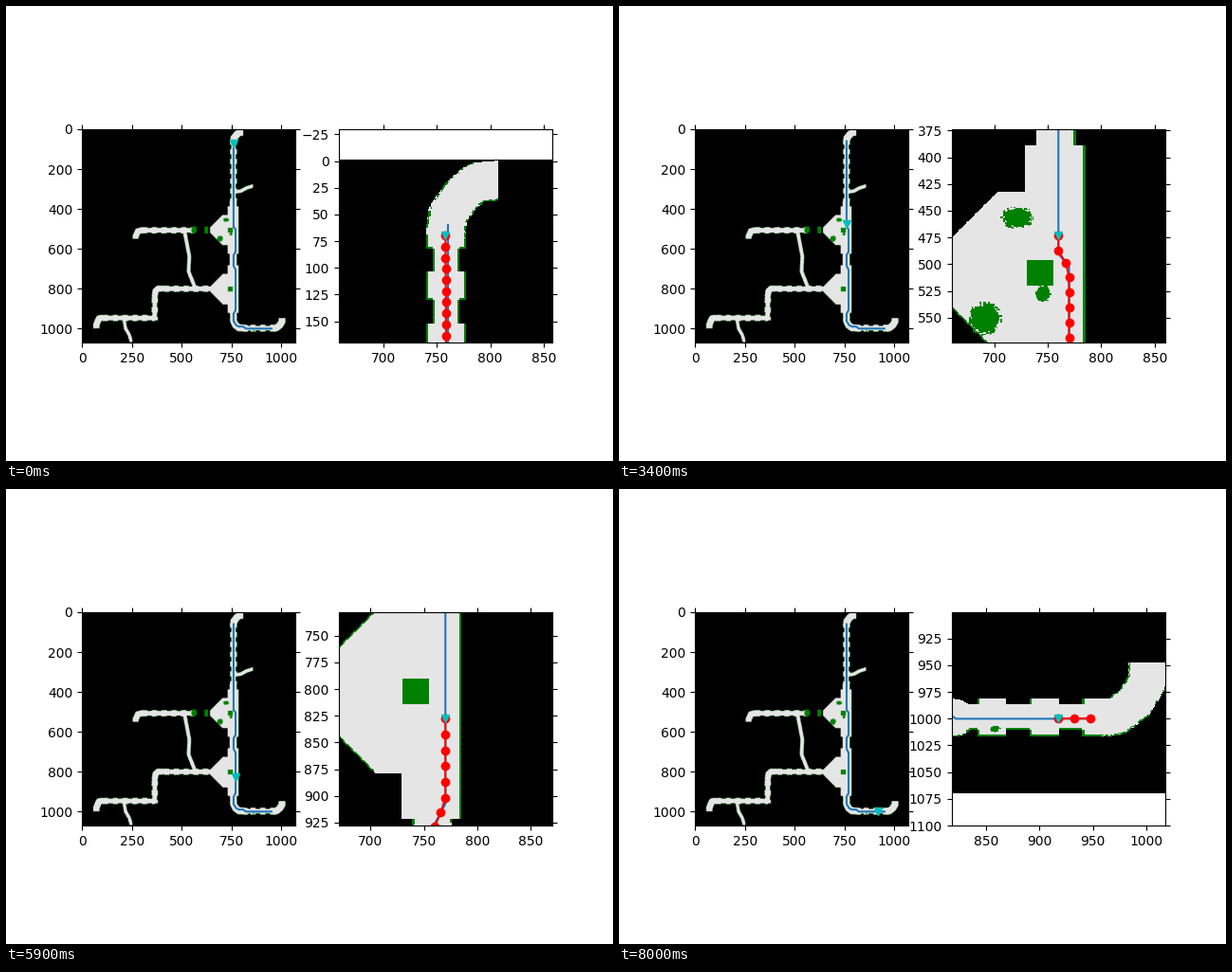
A matplotlib script for the animation above (8100 ms loop, 640 by 480 pixels).

```python
import numpy as np
import matplotlib.pyplot as plt
from matplotlib.animation import FuncAnimation
from matplotlib.ticker import MultipleLocator

FRAMES, INTERVAL = 81, 100
WIDTH, HEIGHT = 1072, 1070
FLOOR, WALL = (229, 229, 229), (0, 128, 0)
SHAFT_X, HALL_YS = 757.7, (508.5, 803)

rng = np.random.default_rng(4)
X, Y = np.meshgrid(np.arange(WIDTH), np.arange(HEIGHT))


def noise():
    """Random values in two-unit grains."""
    return rng.random((HEIGHT // 2, WIDTH // 2)).repeat(2, 0).repeat(2, 1)


def box(x0, y0, x1, y1):
    return (X >= x0) & (X < x1) & (Y >= y0) & (Y < y1)


def notched(along, across, start, end, centre, phase, wide=18.5, narrow=12.3):
    """Straight corridor whose walls step in and out."""
    half = np.where((along - phase) % 48.9 < 27, wide, narrow)
    return (along >= start) & (along < end) & (np.abs(across - centre) < half)


def tunnel(half, *points):
    """Everything within a given distance of a polyline."""
    mask = np.zeros(X.shape, bool)
    for (x0, y0), (x1, y1) in zip(points, points[1:]):
        dx, dy = x1 - x0, y1 - y0
        t = np.clip(((X - x0) * dx + (Y - y0) * dy) / (dx * dx + dy * dy), 0, 1)
        mask |= np.hypot(X - x0 - t * dx, Y - y0 - t * dy) < half
    return mask


def hall(cy):
    """Tall room with a funnel tapering to the west."""
    funnel = np.abs(Y - cy) < np.minimum(76.5, X - 627)
    return box(729, cy - 119, 785, cy + 119) | funnel & (X > 640) & (X < 740)


def blob(cx, cy, rx, ry):
    return ((X - cx) / rx) ** 2 + ((Y - cy) / ry) ** 2 < 0.5 + 0.6 * noise()


def build_map():
    side = tunnel(10, (770, 317), (795, 313), (822, 298), (860, 286)) & (X < 856)
    bends = (
        tunnel(18.5, (SHAFT_X, 66), (760, 50), (772, 33), (786, 21), (810, 19)) & (X < 807)
        | tunnel(18, (SHAFT_X, 930), (758, 962), (768, 983), (785, 996), (820, 999))
        | tunnel(18, (960, 999), (972, 997), (988, 985), (1000, 965), (1000, 940)) & (Y >= 948))
    west = (
        notched(X, Y, 290, 560, 509, 300, wide=17)
        | tunnel(16, (268, 560), (268, 540), (280, 513), (300, 509)) & (Y < 553)
        | notched(X, Y, 395, 645, 801, 410, wide=17)
        | tunnel(16, (364, 835), (368, 812), (380, 801), (400, 800))
        | notched(Y, X, 833, 960, 364, 845, wide=17)
        | notched(X, Y, 92, 366, 947, 105, wide=17)
        | tunnel(17, (72, 1010), (72, 980), (85, 950), (95, 947)) & (Y < 1000)
        | tunnel(10, (514, 520), (537, 640), (533, 715), (566, 796))
        | tunnel(9, (210, 955), (218, 1000), (236, 1030), (245, 1060)))
    floor = (side | bends | west | box(739, 359, 776, 930)
             | notched(Y, X, 62, 364, SHAFT_X, 104)
             | notched(X, Y, 820, 964, 998.8, 842, 18, 12))
    for cy in HALL_YS:
        floor |= hall(cy)

    left, right, above, below = (
        floor & ~np.roll(floor, step, axis)
        for step, axis in ((2, 1), (-2, 1), (2, 0), (-2, 0)))
    is_west, is_hall = X <= 640, (X > 640) & (Y > 362) & (Y < 922)
    rim = left | right & (X < 800) | below
    funnel = (X < 703) & (Y > 540)
    wall = np.where(is_west, rim | above,
                    np.where(is_hall, right | below & (Y < 640) | (rim | above) & funnel,
                             rim | above & side))
    rough = is_west | ~is_hall & bends
    wall &= ~rough | (noise() < 0.6)

    for cy in HALL_YS:
        wall |= box(730, cy - 12, 755, cy + 12)
    for spot in ((721, 457, 15, 11), (745, 528, 8, 8), (691, 551, 16, 16),
                 (561, 507, 16, 21), (858, 1009, 5, 3)):
        wall |= blob(*spot)
    wall |= box(613, 491, 632, 525)

    image = np.zeros(X.shape + (3,), np.uint8)
    image[floor] = FLOOR
    image[wall] = WALL
    return image


# Planned route: straight runs joined by short diagonals.
route = np.array([
    (760, 60), (760, 490), (770, 503), (770, 615), (760, 632), (760, 685), (770, 705),
    (770, 907.5), (760, 926), (760, 962), (773, 983), (787, 990), (808, 990),
    (822, 1000.1), (950, 1000.1)])
arc = np.append(0, np.cumsum(np.hypot(*np.diff(route, axis=0).T)))

# The robot eases up to cruising speed and drifts onto the route.
steps = np.arange(FRAMES + 2)
speed = 14.83 - 4.55 * np.exp(-((steps + 0.5) / 27) ** 2)
travelled = 9.95 + np.cumsum(speed) - speed
robot_x = np.interp(travelled, arc, route[:, 0]) - np.maximum(0, 2 - 0.07 * steps)
robot_y = np.interp(travelled, arc, route[:, 1])

fig, (overview, closeup) = plt.subplots(1, 2, figsize=(6.4, 4.8), dpi=100)
world = build_map()
markers = []
for ax, smoothing in ((overview, "antialiased"), (closeup, "nearest")):
    ax.imshow(world, interpolation=smoothing)
    ax.tick_params(top=True, right=True)
    ax.set_autoscale_on(False)
    ax.plot(*route.T, color="tab:blue")
    if ax is closeup:
        ahead, = ax.plot([], [], "ro-")
    markers += ax.plot([], [], "cv")
closeup.xaxis.set_major_locator(MultipleLocator(50))
closeup.yaxis.set_major_locator(MultipleLocator(25))


def update(k):
    x, y = robot_x[k], robot_y[k]
    for marker in markers:
        marker.set_data([x], [y])
    ahead.set_data(robot_x[k:], robot_y[k:])
    closeup.set(xlim=(x - 100, x + 100), ylim=(y + 100, y - 100))
    return [*markers, ahead]


anim = FuncAnimation(fig, update, frames=FRAMES, interval=INTERVAL, repeat=True, repeat_delay=0)
plt.show()
```
